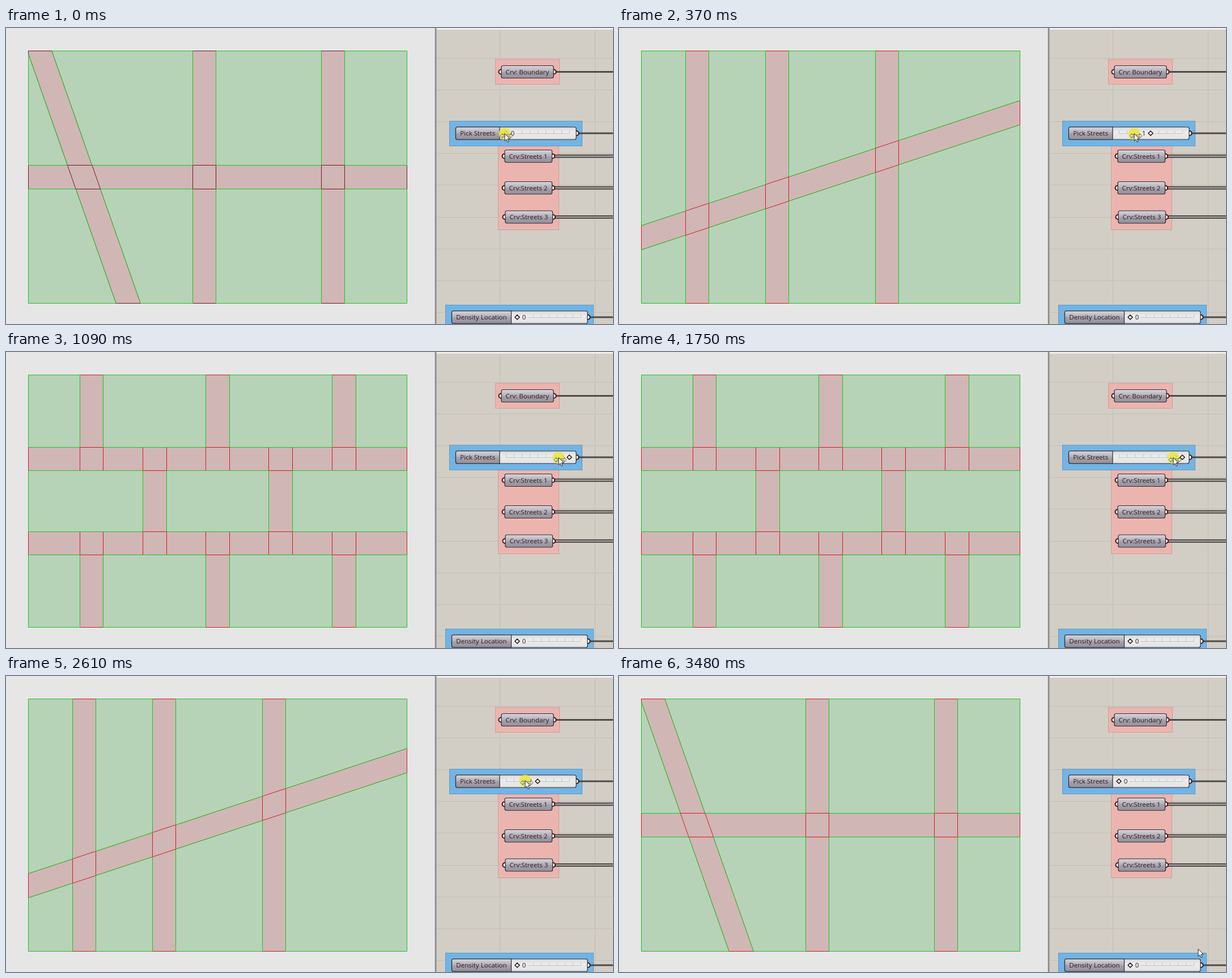
Recreate the animation shown at these times as an HTML page. Size 1071 by 523 pixels, loop 3.56 s.

```html
<!DOCTYPE html>
<html lang="en">
<head>
<meta charset="utf-8">
<title>Street picker</title>
<style>
html, body { margin: 0; width: 100%; height: 100%; overflow: hidden; background: #e6e6e6; }
svg { display: block; width: 1071px; height: 523px; }
text { font: 11.55px "Open Sans", "Noto Sans", sans-serif; fill: #33171d; text-anchor: middle; }
.streets { fill: none; stroke: #d21a1e; }
.dark .streets { stroke: #741719; }
.land { fill: #d1b6b6; stroke: none; }
.blocks { fill: #b6d3b8; stroke: #1cc41c; }
.grid { stroke: #c3beb2; }
.wire { stroke: #4d4c4b; stroke-width: 3; }
.double { stroke-width: 6; }
.gap { stroke: #cfc8c0; stroke-width: 1.4; }
.grip { fill: #fff; stroke: #3d1517; stroke-width: 2; }
.pink { fill: #ebb4af; stroke: #cf9d98; }
.blue { fill: #70b4e6; stroke: #5d9ac6; }
.frame { stroke: #302c32; stroke-width: 1.2; }
.ticks { fill: none; stroke: #c2c2c4; }
.knob { fill: #fff; stroke: #2d0f10; stroke-width: 1.5; }
</style>
</head>
<body>
<svg viewBox="0 0 1071 523">
  <defs>
    <linearGradient id="metal" x2="0" y2="1">
      <stop offset="0" stop-color="#d8d6dc"/><stop offset=".45" stop-color="#b4b1ba"/>
      <stop offset=".55" stop-color="#a3a0aa"/><stop offset="1" stop-color="#94919b"/>
    </linearGradient>
    <linearGradient id="track" x2="0" y2="1">
      <stop offset="0" stop-color="#d9d9db"/><stop offset=".4" stop-color="#ececec"/>
      <stop offset="1" stop-color="#e3e3e4"/>
    </linearGradient>
    <path id="arrow" d="M0 0V13L3 10.2L5 15L7.2 14L5.1 9.3H9.2Z" fill="#fff" stroke="#222" stroke-width="1"/>
  </defs>
  <g id="plan"></g>
  <g id="panel"></g>
  <g id="pick"></g>
  <g id="drag">
    <circle r="10.5" fill="#ece63c" fill-opacity=".88"/>
    <path d="M-8 3.5L-4 -.5V2H10V-.5L14 3.5L10 7.5V5H-4V7.5Z" fill="#e9e8d8" stroke="#55523a" stroke-width=".9"/>
    <use href="#arrow" y="-.5"/>
  </g>
  <use id="pointer" href="#arrow"/>
</svg>
<script>
const $ = id => document.getElementById(id);
const poly = (...pts) => 'M' + pts.map(p => p.join(' ')).join('L') + 'Z';
const box = (x1, y1, x2, y2) => poly([x1, y1], [x2, y1], [x2, y2], [x1, y2]);
const path = (cls, d) => `<path class="${cls}" d="${d}"/>`;

// Street plans: land, street outlines, then the blocks between them
const L = 39.5, T = 40.5, R = 707.5, B = 486.5;
const plan = (streets, blocks) => path('land', box(L, T, R, B)) +
  path('streets', streets.join('')) + path('blocks', blocks.join(''));

function slantPlan() {
  const lean = .351, y1 = 242.5, y2 = 284.5;
  const left = y => [194 - lean * (B - y), y];
  const right = y => [237.5 - lean * (B - y), y];
  const start = [L, 46];
  const blocks = [
    poly(start, left(y1), [L, y1]),
    poly([L, y2], left(y2), left(B), [L, B]),
    poly(right(T), [329.5, T], [329.5, y1], right(y1)),
    poly(right(y2), [329.5, y2], [329.5, B], right(B))
  ];
  for (const [a, b] of [[370.5, 556.5], [597.5, R]])
    blocks.push(box(a, T, b, y1), box(a, y2, b, B));
  return plan([
    poly([L, T], right(T), right(B), left(B), start),
    box(329.5, T, 370.5, B), box(556.5, T, 597.5, B), box(L, y1, R, y2)
  ], blocks);
}

function risePlan() {
  const upper = x => [x, 349 - (x - L) * .3308];
  const lower = x => [x, 392 - (x - L) * .3308];
  const cols = [[L, 117.5], [158.5, 258.5], [299.5, 452.5], [493.5, R]];
  const streets = cols.slice(1).map(([a], i) => box(cols[i][1], T, a, B));
  streets.push(poly(upper(L), upper(R), lower(R), lower(L)));
  return plan(streets, cols.map(([a, b]) =>
    poly([a, T], [b, T], upper(b), upper(a)) + poly(lower(a), lower(b), [b, B], [a, B])));
}

function brickPlan() {
  const y1 = 168.5, y2 = 209.5, y3 = 317.5, y4 = 358.5;
  const outer = [[130.5, 171.5], [352.5, 394.5], [575.5, 617.5]];
  const inner = [[241.5, 283.5], [463.5, 505.5]];
  const streets = [box(L, y1, R, y2), box(L, y3, R, y4)], blocks = [];
  const row = (gaps, top, bottom, from, to) => {
    const xs = [L, ...gaps.flat(), R];
    for (let i = 0; i < xs.length; i += 2) blocks.push(box(xs[i], top, xs[i + 1], bottom));
    for (const [a, b] of gaps) streets.push(box(a, from, b, to));
  };
  row(outer, T, y1, T, y2);
  row(inner, y2, y3, y1, y4);
  row(outer, y4, B, y3, B);
  return plan(streets, blocks);
}

const plans = [slantPlan(), risePlan(), brickPlan()];

// Node canvas
const rect = (x1, y1, x2, y2, attrs) =>
  `<rect x="${x1}" y="${y1}" width="${x2 - x1}" height="${y2 - y1}" ${attrs}/>`;
const label = (s, x, y) => `<text x="${x}" y="${y + 4.2}">${s}</text>`;
const grip = (x, y) => `<circle class="grip" cx="${x}" cy="${y}" r="4"/>`;
const wire = (x, y, cls = '') => path('wire ' + cls, `M${x} ${y}H1071`);
const knob = (x, y) => path('knob', `M${x - 4} ${y}L${x} ${y - 4}L${x + 4} ${y}L${x} ${y + 4}Z`);

function node(s, x1, x2, y, double) {
  const lines = double ? wire(x2 + 4, y, 'double') + wire(x2 + 4, y, 'gap') : wire(x2 + 4, y);
  return lines + grip(x1 - .5, y) + grip(x2 + .5, y) +
    rect(x1, y - 11, x2, y + 11, 'rx="3" class="frame" fill="url(#metal)"') +
    label(s, (x1 + x2) / 2 - .3, y);
}

function slider(s, x1, mid, x2, y) {
  return wire(x2 + 4, y) + grip(x2 + .5, y) +
    rect(x1, y - 11, x2, y + 11, 'rx="3" class="frame" fill="url(#track)"') +
    path('frame', `M${mid} ${y - 11}V${y + 11}H${x1 + 3}q-3 0 -3 -3V${y - 8}q0 -3 3 -3Z`)
      .replace('/>', ' fill="url(#metal)"/>') +
    label(s, (x1 + mid) / 2, y);
}

function ticks(a, b, y, skipFrom, skipTo) {
  let d = '';
  const step = (b - a) / 8;
  const free = x => x < skipFrom || x > skipTo;
  for (let i = 0; i <= 8; i++) {
    const x = a + i * step;
    if (free(x)) d += `M${Math.round(x) + .5} ${y - 5}v5`;
  }
  if (skipFrom > a) d += `M${a} ${y + .5}H${skipFrom}`;
  if (skipTo < b) d += `M${skipTo} ${y + .5}H${b}`;
  return path('ticks', d);
}

function drawPanel() {
  let grid = 'M871.5 3V523M1039.5 3V523';
  for (let y = 53.5; y < 523; y += 56.1) grid += `M760 ${Math.floor(y) + .5}H1071`;
  $('panel').innerHTML =
    rect(759, 0, 1071, 523, 'fill="#d3cec5"') +
    path('grid', grid) +
    rect(759, 0, 1071, 3, 'fill="#efefef"') +
    rect(756, 0, 757, 523, 'fill="#cfcfcf"') +
    rect(757, 0, 759.5, 523, 'fill="#8b8b8d"') +
    rect(863.5, 55.5, 976.5, 99.5, 'class="pink"') +
    rect(868.5, 204.5, 975.5, 356.5, 'class="pink"') +
    rect(782.5, 164.5, 1016.5, 208.5, 'class="blue" opacity=".97"') +
    rect(775.5, 489.5, 1036.5, 530, 'class="blue"') +
    node('Crv: Boundary', 874, 966, 77.5) +
    node('Crv:Streets 1', 880, 963.5, 226.5, true) +
    node('Crv:Streets 2', 880, 963.5, 282.5, true) +
    node('Crv:Streets 3', 881, 964.5, 334, true) +
    slider('Pick Streets', 793.5, 871, 1006, 186) +
    slider('Density Location', 786.5, 891.5, 1026, 511) +
    ticks(902, 1014, 511, 896, 920) + knob(902, 511) + label('0', 914, 511);
}

function drawPick(value) {
  const x = 882 + 56 * value;
  const text = value ? x - 12 : x + 12;
  $('pick').innerHTML = ticks(882, 994, 186, Math.min(x, text) - 6, Math.max(x, text) + 6) +
    knob(x, 186) + label(value, text, 186);
}

// Pointer stops: start time, x, y; below the slider it is released
const stops = [
  [0, 880, 187], [70, 884, 187], [150, 889, 187], [220, 895, 187], [300, 902, 187],
  [370, 909, 187], [500, 917, 187], [580, 924, 187],
  [800, 929, 187], [870, 939, 187], [940, 951, 187], [1020, 964, 187],
  [1090, 975, 187], [1160, 982, 187], [1230, 985, 187],
  [1750, 978, 187], [1820, 968, 187], [1890, 957, 187], [1970, 947, 187],
  [2040, 939, 186], [2110, 933, 186],
  [2610, 916, 185], [2690, 899, 185], [2760, 891, 184],
  [3040, 900, 198], [3110, 925, 238], [3180, 957, 304], [3260, 986, 375],
  [3330, 1006, 434], [3400, 1018, 470], [3480, 1022, 482.5]
];
const LOOP = 3560;
const firstSwitch = 370;
let shown = -1;

function render(t) {
  const [, x, y] = stops.findLast(s => s[0] <= t);
  const held = y < 190;
  const value = !held || x < 907 ? 0 : x < 966 ? 1 : 2;
  if (value !== shown) {
    shown = value;
    $('plan').innerHTML = plans[value];
    drawPick(value);
  }
  $('plan').classList.toggle('dark', t < firstSwitch);
  $('drag').style.display = held ? '' : 'none';
  $('pointer').style.display = held ? 'none' : '';
  $(held ? 'drag' : 'pointer').setAttribute('transform', `translate(${x} ${y})`);
}

drawPanel();
render(0);
const begin = performance.now();
(function tick() {
  render((performance.now() - begin) % LOOP);
  requestAnimationFrame(tick);
})();
</script>
</body>
</html>
```
